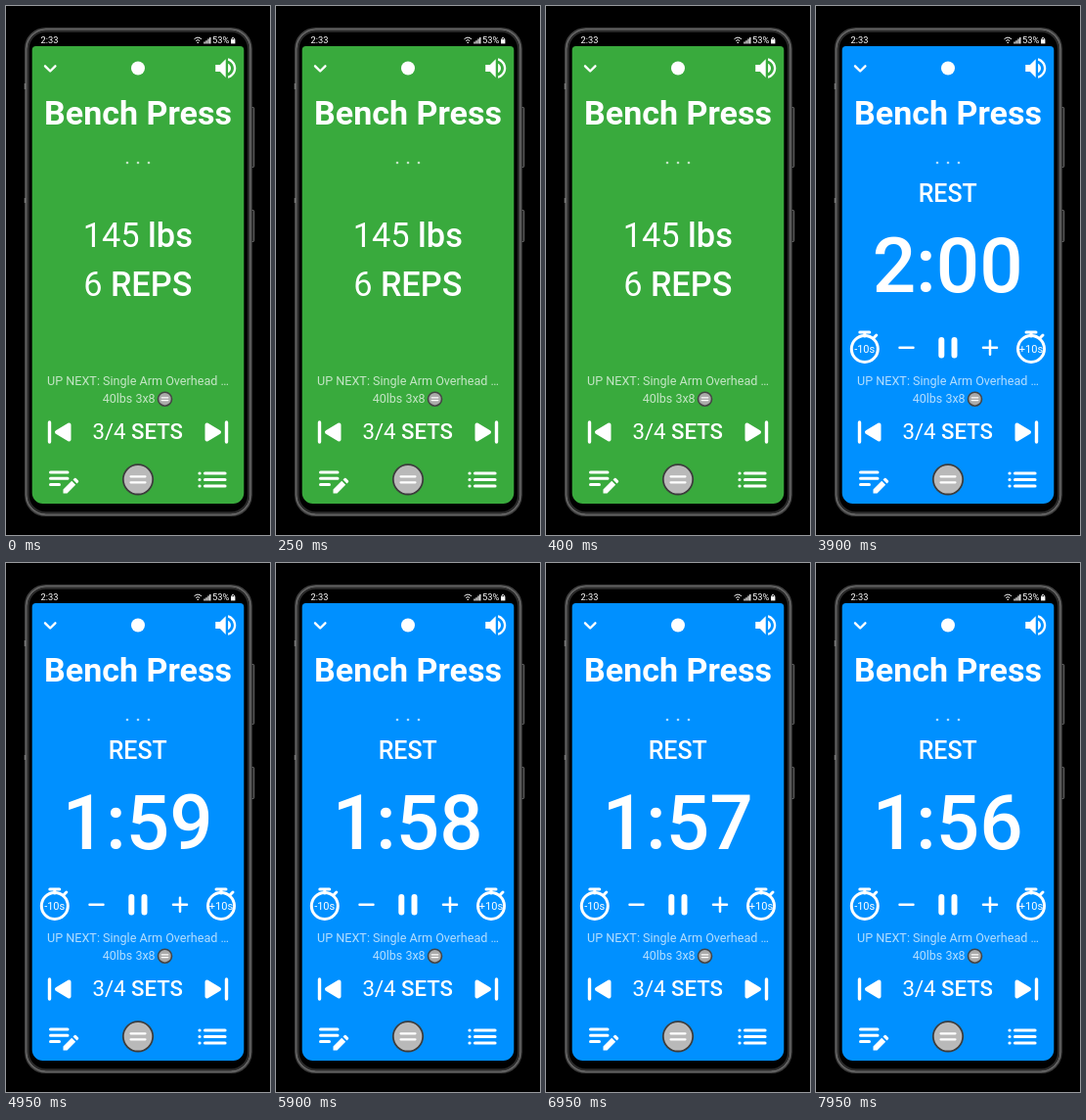
Animation of 270 by 540 pixels, one loop 8000 ms. Source, as an HTML page:

```html
<!DOCTYPE html>
<html lang="en">
<head>
<meta charset="utf-8">
<title>Workout timer</title>
<style>
  html, body { margin: 0; height: 100%; overflow: hidden; background: #000; }
  svg { display: block; width: 100vw; height: 100vh; }
  text { font-family: Roboto, sans-serif; fill: #fff; text-anchor: middle; }
  .medium { font-weight: 500; }
  .bold { font-weight: 700; }
  .dim { opacity: .7; }
  .line { fill: none; stroke: #fff; stroke-linecap: round; stroke-linejoin: round; }
  .solid { fill: #fff; stroke: #fff; stroke-linejoin: round; }
</style>
</head>
<body>
<svg viewBox="0 0 270 540">
  <defs>
    <g id="stopwatch">
      <circle class="line" r="13.5" stroke-width="3"/>
      <path class="line" stroke-width="3" stroke-linecap="butt" d="M-5-17H5M0-17V-13M9.5-11.5l2.500-2.500"/>
    </g>
    <g id="skip">
      <path class="solid" stroke-width="4" d="M-6-7.500L6.500 0-6 7.500Z"/>
      <path class="line" stroke-width="3.400" d="M14-10V10"/>
    </g>
    <g id="equals">
      <circle r="15.2" fill="#b9b9b9" stroke="#3c3c3c" stroke-width="1.800"/>
      <path class="line" stroke-width="2.200" d="M-7.500-3H7.500M-7.500 3H7.500"/>
    </g>
  </defs>

  <!-- phone -->
  <g fill="#222" stroke="#7a7a7a" stroke-width=".9">
    <rect x="250" y="103.500" width="3.700" height="61" rx="1"/>
    <rect x="250" y="208.500" width="3.700" height="32" rx="1"/>
  </g>
  <g fill="#000">
    <rect x="19.700" y="22.700" width="231.400" height="497.600" rx="21" stroke="#444" stroke-width="1.400"/>
    <rect x="21" y="24" width="228.800" height="495" rx="20" stroke="#727272" stroke-width="1.500"/>
    <rect x="22.700" y="25.700" width="225.400" height="491.600" rx="18" stroke="#2c2c2c" stroke-width="2"/>
  </g>
  <path d="M19.500 79v6M19.500 196v5" stroke="#777" stroke-width="1.600"/>
  <path id="screen" d="M30.700 41H239.300a4 4 0 0 1 4 4V497a11 11 0 0 1-11 11H37.700a11 11 0 0 1-11-11V45a4 4 0 0 1 4-4Z"/>

  <!-- status bar -->
  <text x="44.500" y="38.400" font-size="9.300">2:33</text>
  <text x="219.700" y="38.400" font-size="9.300">53%</text>
  <g fill="none" stroke="#fff">
    <path d="M192.500 33.800q3.700-3.300 7.400 0M194.200 35.500q2-1.800 4 0"/>
    <path d="M196.200 36.700v1.300" stroke-width="1.400"/>
    <path d="M203 38.400v-1.800M205 38.400v-3.200M207 38.400v-4.800M208.800 38.400v-6.400" stroke-width="1.300"/>
    <path d="M231 34.500v-1.500q1.200-1.600 2.400 0v1.500" stroke-width=".9"/>
  </g>
  <path d="M230 34.200h4.400v4.200h-4.400Z" fill="#fff"/>

  <!-- header -->
  <path class="line" stroke-width="2.400" d="M40 61.300l5.200 5.200 5.200-5.200"/>
  <circle cx="135" cy="63.500" r="7" fill="#fff"/>
  <path fill="#fff" transform="translate(210.700 49.500) scale(1.170)" d="M3 9v6h4l5 5V4L7 9H3zm13.500 3c0-1.770-1.020-3.290-2.500-4.030v8.050c1.480-.73 2.500-2.250 2.500-4.020zM14 3.230v2.060c2.890.86 5 3.540 5 6.710s-2.110 5.850-5 6.710v2.060c4.010-.91 7-4.490 7-8.770s-2.990-7.860-7-8.770z"/>
  <text class="bold" x="135" y="121" font-size="34">Bench Press</text>
  <g class="dim" fill="#fff">
    <circle cx="124" cy="160" r="1.300"/><circle cx="135" cy="160" r="1.300"/><circle cx="146" cy="160" r="1.300"/>
  </g>

  <g id="lift">
    <text x="134.800" y="246.400" font-size="34.300">145 <tspan class="medium">lbs</tspan></text>
    <text x="134.800" y="296.400" font-size="34.300">6 <tspan class="medium">REPS</tspan></text>
  </g>

  <g id="rest">
    <text class="medium" x="134.700" y="199.600" font-size="25">REST</text>
    <text class="medium" id="clock" x="134.700" y="292.200" font-size="78.200"></text>
    <use href="#stopwatch" x="49.800" y="350"/>
    <use href="#stopwatch" x="220" y="350"/>
    <text x="49.700" y="353.500" font-size="11">-10s</text>
    <text x="220" y="353.500" font-size="11">+10s</text>
    <path class="line" stroke-width="2.500" d="M85.500 348.700H99.500M171 348.700H185M178 341.700V355.700"/>
    <path class="line" stroke-width="6" d="M128.300 341V356.500M141.500 341V356.500"/>
  </g>

  <!-- footer -->
  <text class="dim" x="135" y="386.800" font-size="12.600">UP NEXT: Single Arm Overhead …</text>
  <text class="dim" x="125.700" y="405.200" font-size="12.500">40lbs 3x8</text>
  <g transform="translate(162.500 401.200)">
    <circle r="7" fill="#aaa" stroke="#444" stroke-width="1.600"/>
    <path class="line" stroke-width="1.300" d="M-3.300-1.400H3.300M-3.300 1.400H3.300"/>
  </g>
  <use href="#skip" transform="translate(58.500 435) scale(-1 1)"/>
  <use href="#skip" transform="translate(211.500 435)"/>
  <text x="134.700" y="441.900" font-size="22.200">3/4 <tspan class="medium">SETS</tspan></text>
  <path class="line" stroke-width="3" d="M45.500 476H63M45.500 482.300H63M45.500 488.600H54.500"/>
  <path fill="#fff" d="M58.500 497.500v-4l8.700-8.700 4 4-8.700 8.700ZM68.500 483.500l1.500-1.500q.8-.6 1.600 0l2.400 2.400q.6.8 0 1.600l-1.500 1.500Z"/>
  <use href="#equals" x="135" y="483.300"/>
  <path class="line" stroke-width="3.200" d="M203.500 477H224M203.500 483.500H224M203.500 490H224M198 477h.01M198 483.500h.01M198 490h.01"/>
</svg>
<script>
  const LOOP = 8000, REST_START = 3900;
  const ticks = [4800, 5900, 6950, 7950];
  const el = id => document.getElementById(id);
  const show = (id, visible) => el(id).setAttribute("visibility", visible ? "visible" : "hidden");

  function draw() {
    const t = performance.now() % LOOP;
    const resting = t >= REST_START;
    const seconds = 120 - ticks.filter(tick => t >= tick).length;
    el("screen").setAttribute("fill", resting ? "#0090ff" : "#39aa3d");
    show("lift", !resting);
    show("rest", resting);
    el("clock").textContent = Math.floor(seconds / 60) + ":" + String(seconds % 60).padStart(2, "0");
    requestAnimationFrame(draw);
  }
  draw();
</script>
</body>
</html>
```
